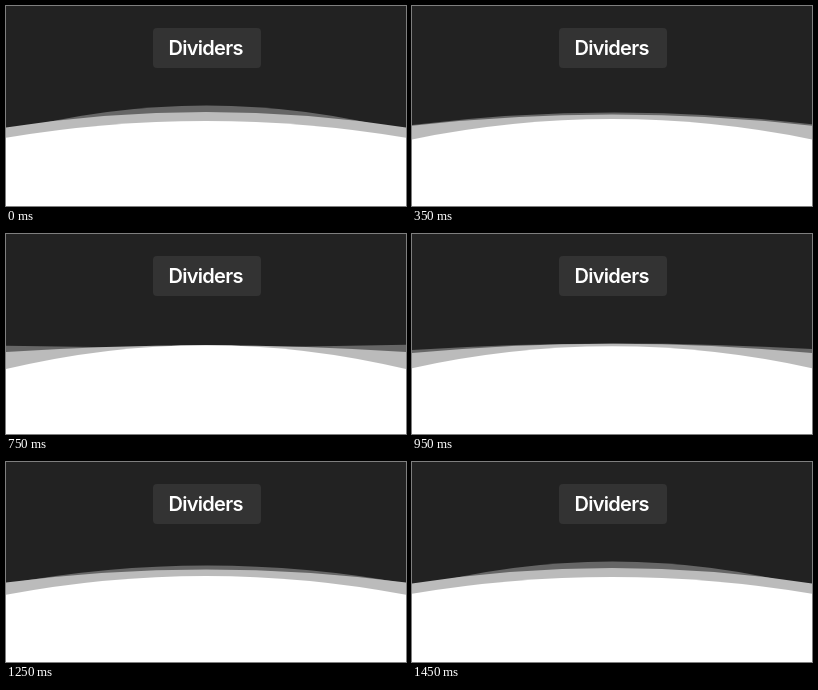
Write an HTML page that moves like this. It is 400 px wide and 200 px high and loops after 1.5 s.

```html
<!DOCTYPE html>
<html lang="en">
<head>
<meta charset="utf-8">
<title>Dividers</title>
<style>
  html, body {
    margin: 0;
    width: 100%;
    height: 100%;
    overflow: hidden;
    background: #222;
  }
  svg { display: block; }
  text {
    font: 600 20px Inter, sans-serif;
    letter-spacing: -.035em;
    text-anchor: middle;
    fill: #fff;
  }
  /* each hill bends between two curves and back */
  path { animation: 750ms linear -25ms infinite alternate; }
  .back { fill: #666; animation-name: back; }
  .middle { fill: #bbb; animation-name: middle; }
  .front { fill: #fff; animation-name: front; }

  @keyframes back {
    from { d: path("M0 126.5 Q200 71.6 400 126.3 V200 H0 Z"); }
    to { d: path("M0 111.3 Q200 117 400 110.2 V200 H0 Z"); }
  }
  @keyframes middle {
    from { d: path("M0 121.6 Q200 90 400 121.6 V200 H0 Z"); }
    to { d: path("M0 118 Q200 104.8 400 118 V200 H0 Z"); }
  }
  @keyframes front {
    from { d: path("M0 131.7 Q200 98.7 400 131.7 V200 H0 Z"); }
    to { d: path("M0 135.2 Q200 86.8 400 135.2 V200 H0 Z"); }
  }
</style>
</head>
<body>
<svg width="400" height="200" viewBox="0 0 400 200">
  <rect width="400" height="200" fill="#222"/>
  <rect x="147" y="22" width="108" height="40" rx="4" fill="#333"/>
  <text x="199.6" y="49">Dividers</text>
  <path class="back" d="M0 126.5 Q200 71.6 400 126.3 V200 H0 Z"/>
  <path class="middle" d="M0 121.6 Q200 90 400 121.6 V200 H0 Z"/>
  <path class="front" d="M0 131.7 Q200 98.7 400 131.7 V200 H0 Z"/>
</svg>
</body>
</html>
```
